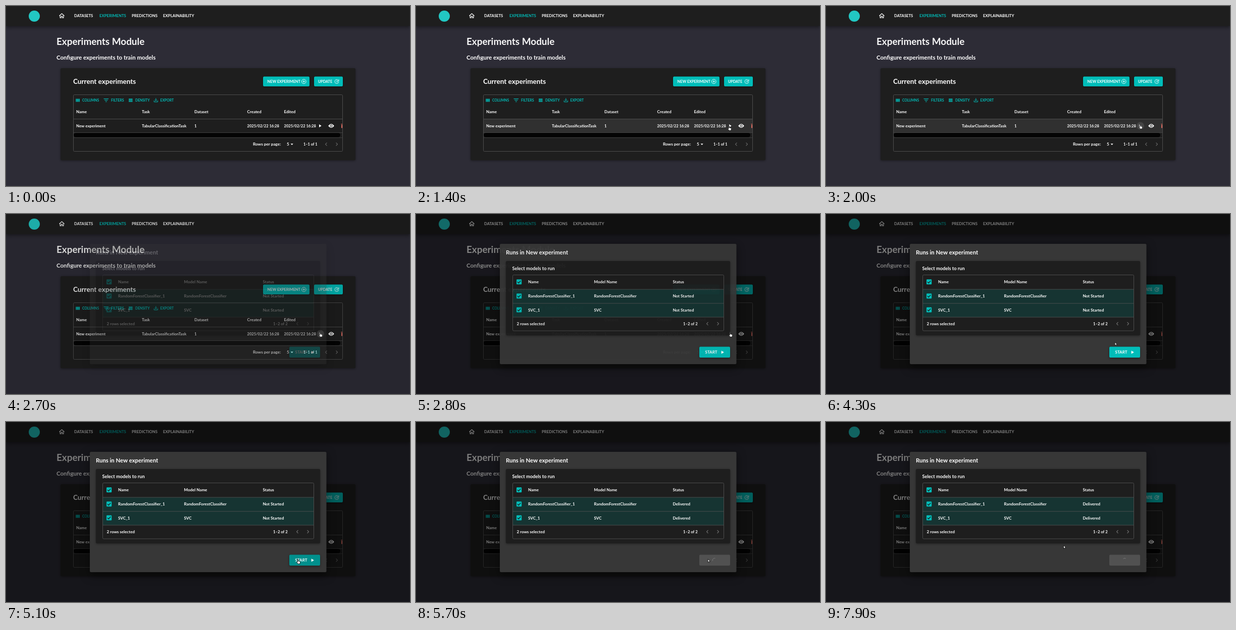
An HTML page with a canvas for the animation above (8 s loop, 800 px wide and 356 px high).

```html
<!DOCTYPE html>
<html lang="en">
<head>
<meta charset="utf-8">
<title>Experiments Module</title>
<style>
  html, body { margin: 0; width: 100%; height: 100%; overflow: hidden; background: #2d2c36; }
  canvas { display: block; width: 800px; height: 356px; }
</style>
</head>
<body>
<canvas id="stage"></canvas>
<script>
const W = 800, H = 356, LOOP = 8000, STEP = 100;
const TEAL = '#00bdb9', CARD = '#1e1e1e', LINE = '#4d4d4d', WHITE = '#fff', GRAY = '#6c6c6c';
const scale = window.devicePixelRatio || 1;

function setup(canvas) {
  canvas.width = W * scale;
  canvas.height = H * scale;
  const c = canvas.getContext('2d');
  c.scale(scale, scale);
  return c;
}
const stageCtx = setup(document.getElementById('stage'));
const layer = document.createElement('canvas');
const dialogCtx = setup(layer);
let g = stageCtx;

// Drawing helpers, all working on the current context g
function text(s, x, y, size = 8, color = WHITE, weight = 700) {
  g.font = `${weight} ${size}px Lato, "Open Sans", sans-serif`;
  g.fillStyle = color;
  g.fillText(s, x, y);
}
function rect(x, y, w, h, color) {
  g.fillStyle = color;
  g.fillRect(x, y, w, h);
}
function box(x, y, w, h, r, fill, stroke) {
  g.beginPath();
  g.roundRect(x, y, w, h, r);
  if (fill) { g.fillStyle = fill; g.fill(); }
  if (stroke) { g.strokeStyle = stroke; g.lineWidth = 1; g.stroke(); }
}
function shadowBox(x, y, w, h, r, fill, blur, dy, alpha) {
  g.save();
  g.shadowColor = `rgba(0,0,0,${alpha})`;
  g.shadowBlur = blur * scale;
  g.shadowOffsetY = dy * scale;
  box(x, y, w, h, r, fill);
  g.restore();
}
function trace(d, x, y, stroke, width = 1, fill) {
  g.save();
  g.translate(x, y);
  const p = new Path2D(d);
  g.lineJoin = 'round';
  if (fill) { g.fillStyle = fill; g.fill(p); }
  if (stroke) { g.strokeStyle = stroke; g.lineWidth = width; g.stroke(p); }
  g.restore();
}
function disc(x, y, r, color) {
  g.beginPath();
  g.arc(x, y, r, 0, 7);
  g.fillStyle = color;
  g.fill();
}
function arc(x, y, r, from, to, color, width = 1) {
  g.beginPath();
  g.arc(x, y, r, from, to);
  g.strokeStyle = color;
  g.lineWidth = width;
  g.stroke();
}
function pager(x, y, gap) {
  trace('M1.5-3L-1.5 0L1.5 3', x, y, GRAY, 1.1);
  trace('M-1.5-3L1.5 0L-1.5 3', x + gap, y, GRAY, 1.1);
}

function header() {
  shadowBox(0, 0, W, 39.5, 0, CARD, 7, 2, 0.45);
  disc(56, 20, 11, '#22c7c3');
  trace('M-5 .5L0-4L5 .5M-3.4-.5V4.4H-1.2V1.4H1.2V4.4H3.4V-.5', 110.5, 19, WHITE, 1.1);
  text('DATASETS', 135, 22.4, 7.7);
  text('EXPERIMENTS', 185, 22.4, 7.75, TEAL);
  text('PREDICTIONS', 249, 22.4, 7.75);
  text('EXPLAINABILITY', 311, 22.4, 7.85);
}

function toolbar() {
  for (let i = 0; i < 3; i++) {
    rect(138.4 + i * 2.7, 183.5, 2, 6, TEAL);
    rect(193.5 + i * 1.7, 183 + i * 2.8, 9.6 - i * 3.4, 1.1, TEAL);
    rect(243, 183.3 + i * 2.3, 7.6, 1.6, TEAL);
  }
  trace('M0-4V1.2M-2.2-1L0 1.2L2.2-1M-3.6 .6V3.4H3.6V.6', 296.8, 186.3, TEAL, 1);
  text('COLUMNS', 151, 189, 6.7, TEAL);
  text('FILTERS', 208, 189, 7, TEAL);
  text('DENSITY', 256, 189, 6.8, TEAL);
  text('EXPORT', 305.5, 189, 6.8, TEAL);
}

function table(rowHover, playHover) {
  g.save();
  g.beginPath();
  g.rect(133, 175, 533.5, 113);
  g.clip();
  if (rowHover) rect(134, 223.5, 533, 27, '#303030');
  rect(134, 223, 533, 1, LINE);
  rect(134, 250, 533, 1, '#404040');
  box(134, 251, 528, 8.5, 4.2, '#040404');
  rect(134, 260, 533, 1, '#3c3c3c');

  const cols = [139, 269, 373, 477.5, 550.5];
  ['Name', 'Task', 'Dataset', 'Created', 'Edited'].forEach((s, i) => text(s, cols[i], 212, 8));
  text('New experiment', cols[0], 240, 7.85);
  text('TabularClassificationTask', cols[1], 240, 8);
  text('1', cols[2], 240, 7.8);
  text('2025/02/22 16:28', cols[3], 240, 7.55);
  text('2025/02/22 16:28', cols[4], 240, 7.55);

  if (playHover) disc(622.5, 237, 7.5, '#454545');
  trace('M-2-3L2.7 0L-2 3Z', 622, 237, null, 0, WHITE);
  trace('M-5.8 0Q0-7.6 5.8 0Q0 7.6-5.8 0Z', 644, 237, null, 0, WHITE);
  disc(644, 237, 2.5, CARD);
  disc(644, 237, 1.5, WHITE);
  rect(663.5, 233, 7, 1.2, '#d9665c');
  rect(664, 235, 6, 6.3, '#d9665c');

  text('Rows per page:', 489, 276.4, 8.2);
  text('5', 556, 276.4, 8);
  trace('M-2.6-1.3H2.6L0 1.4Z', 566.2, 273.6, null, 0, WHITE);
  text('1–1 of 1', 589, 276.4, 7.4);
  pager(634, 273.3, 21);
  g.restore();
  box(133.5, 175.5, 533, 112, 2, null, LINE);
}

function page(rowHover, playHover) {
  rect(0, 0, W, H, '#2d2c36');
  header();
  text('Experiments Module', 100, 77, 18.9, '#f7f7f7');
  text('Configure experiments to train models', 100, 106, 11.5);
  shadowBox(108, 123, 584, 182, 2.5, CARD, 4, 1, 0.4);
  text('Current experiments', 133, 154, 13.55);

  shadowBox(509, 139.5, 92, 19.5, 2.2, TEAL, 3, 1, 0.4);
  text('NEW EXPERIMENT', 517.5, 152, 7.35);
  arc(589.8, 149.3, 4.3, 0, 7, WHITE, 0.9);
  trace('M-2.3 0H2.3M0-2.3V2.3', 589.8, 149.3, WHITE, 0.9);
  shadowBox(610, 139.5, 57, 19.5, 2.2, TEAL, 3, 1, 0.4);
  text('UPDATE', 618, 152, 7.2);
  arc(655, 149.3, 3.8, 0.1, 5.6, WHITE, 0.9);
  trace('M4-4V-1H1M0-2V.4L1.7 1.4', 655, 149.3, WHITE, 0.9);

  toolbar();
  table(rowHover, playHover);
}

function checkbox(y) {
  box(199, y - 5, 10.2, 10, 1.3, TEAL);
  trace('M-3.2 0L-1 2.2L3.2-2.2', 204.1, y, CARD, 1.3);
}

const inOut = x => x * x * (3 - 2 * x);

// Indeterminate ring: the arc grows, then its tail catches up, while the whole ring turns
function spinner(t) {
  const p = ((t - 5700) / 1073 + 0.79 + 10) % 1;
  const first = p < 0.5;
  const k = inOut(first ? p * 2 : p * 2 - 1);
  const start = first ? 15 * k : 15 + 110 * k;
  const len = Math.min(first ? 1 + 99 * k : 100, 125.7 - start);
  const from = start / 20 + p * 2 * Math.PI;
  arc(591.5, 273.5, 4.1, from, from + len / 20, '#7c7c7c', 0.9);
}

function dialog(t) {
  const running = t >= 5300, hover = t >= 4500 && !running;
  g.clearRect(0, 0, W, H);
  shadowBox(166, 59, 468.5, 238, 2.5, '#373737', 18, 6, 0.5);
  text('Runs in New experiment', 178, 79.8, 11.3);
  shadowBox(178, 93, 444, 147, 2.5, CARD, 4, 1, 0.4);
  text('Select models to run', 190.5, 111.4, 9.25);

  rect(191, 149, 418, 55, '#163432');
  for (const y of [148.5, 176.3, 203.5]) rect(191, y, 418, 1, '#484d4d');
  box(191.5, 120.5, 418, 110.5, 2, null, LINE);

  const status = t >= 5400 ? 'Delivered' : 'Not Started';
  const rows = [
    ['Name', 'Model Name', 'Status', 134.3],
    ['RandomForestClassifier_1', 'RandomForestClassifier', status, 162.3],
    ['SVC_1', 'SVC', status, 189.5]
  ];
  for (const [name, model, state, y] of rows) {
    checkbox(y);
    text(name, 222, y + 3, 8);
    text(model, 352.5, y + 3, 8);
    text(state, 508.5, y + 3, 8.05);
  }
  text('2 rows selected', 199.5, 220.2, 8);
  text('1–2 of 2', 529, 220.2, 7.7);
  pager(577, 217, 21);

  if (running) {
    box(561, 262.5, 61, 21.5, 2.2, '#515151');
    spinner(t);
  } else {
    shadowBox(561, 262.5, 61, 21.5, 2.2, hover ? '#00908d' : TEAL, 4, 1.5, 0.4);
    text('START', 572.5, 276.3, 8);
    trace('M-2.3-3.2L2.9 0L-2.3 3.2Z', 607, 273.4, null, 0, WHITE);
  }
}

// Pointer tip: time, x, y
const path = [
  [900, 592, 276], [1500, 622, 233.5], [3100, 622, 233.5], [4300, 572, 253.5],
  [4700, 578, 271], [6200, 578, 271], [6700, 522, 257], [6800, 522, 257], [7400, 470.5, 244]
];
function pointer(t) {
  if (t < path[0][0]) return;
  let [, x, y] = path[path.length - 1];
  const i = path.findIndex(k => k[0] > t);
  if (i > 0) {
    const a = path[i - 1], b = path[i];
    const k = inOut((t - a[0]) / (b[0] - a[0]));
    x = a[1] + (b[1] - a[1]) * k;
    y = a[2] + (b[2] - a[2]) * k;
  }
  const hand = (t >= 1400 && t <= 2800) || (t >= 4500 && t < 5300);
  trace(hand
    ? 'M-.7 .6Q0-.4 .7 .6V4L4 4.8Q4.8 5 4.7 6L4 9.6H.2L-2.4 6.4Q-2.2 5.2-.7 6Z'
    : 'M0 0V6.4L1.5 5.1L2.5 7.4L3.6 6.9L2.6 4.7H4.6Z', x, y, '#111', 0.9, WHITE);
}

// cubic-bezier(.4, 0, .2, 1) solved for progress x
function standardEase(x) {
  if (x <= 0 || x >= 1) return x <= 0 ? 0 : 1;
  let lo = 0, hi = 1, u = 0.5;
  for (let i = 0; i < 24; i++) {
    u = (lo + hi) / 2;
    const bx = 1.2 * u * (1 - u) ** 2 + 0.6 * u * u * (1 - u) + u ** 3;
    if (bx < x) lo = u; else hi = u;
  }
  return u * u * (3 - 2 * u);
}

function draw(t) {
  g = stageCtx;
  page(t >= 1400 && t < 2700, t >= 1500 && t <= 2700);
  const fade = standardEase((t - 2640) / 225);
  if (fade > 0) {
    rect(0, 0, W, H, `rgba(0,0,0,${0.5 * fade})`);
    g = dialogCtx;
    dialog(t);
    g = stageCtx;
    g.globalAlpha = fade;
    g.drawImage(layer, 0, 0, W, H);
    g.globalAlpha = 1;
  }
  pointer(t);
}

const began = performance.now();
function tick() {
  const t = (performance.now() - began) % LOOP;
  draw(Math.floor(t / STEP) * STEP);
  requestAnimationFrame(tick);
}
tick();
</script>
</body>
</html>
```
